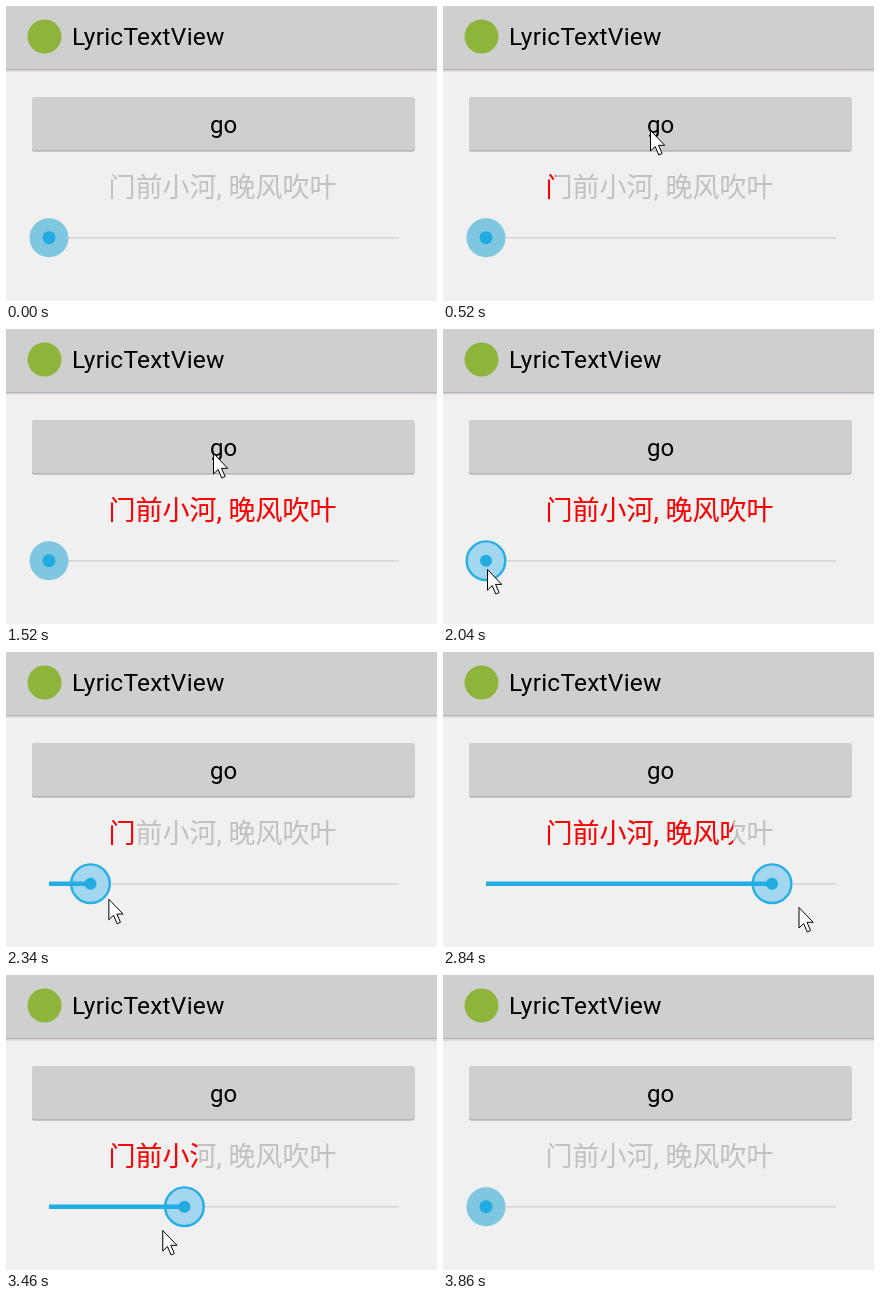
An HTML page for the animation above (4.08 s loop, 431 px wide and 295 px high).

```html
<!DOCTYPE html>
<html lang="zh">
<head>
<meta charset="utf-8">
<title>LyricTextView</title>
<style>
  html, body { margin: 0; width: 100%; height: 100%; overflow: hidden; background: #f0f0f0; }
  svg { display: block; width: 431px; height: 295px; }
  text { font-family: Roboto, "Noto Sans CJK SC", "Noto Sans CJK", sans-serif; }
  .label { font-size: 24px; fill: #000; }
  .title { font-size: 24.5px; letter-spacing: 0.22px; }
  .lyric { font-size: 27px; fill: #c1c1c1; }
  .sung { fill: #f00; }
  .halo { fill: #7fc6e1; r: 19.5px; }
  .dot { fill: #22abe0; r: 6.5px; }
  .held .halo { fill: #a3d6ef; stroke: #27aee3; stroke-width: 2.4px; r: 19.3px; }
  .held .dot { r: 6px; }
  #button { fill: #cfcfcf; }
  #button.held { fill: #a3cfe0; }
</style>
</head>
<body>
<svg viewBox="0 0 431 295">
  <defs>
    <clipPath id="wipe"><rect id="wipeBox" x="103" y="160" height="44" width="0"/></clipPath>
  </defs>

  <rect width="431" height="295" fill="#f0f0f0"/>
  <rect width="431" height="63" fill="#cfcfcf"/>
  <rect y="63" width="431" height="1.5" fill="#b7b0b7"/>
  <rect y="64.5" width="431" height="1.5" fill="#e0dde0"/>
  <circle cx="38.5" cy="30.5" r="17" fill="#8db53c"/>
  <text class="label title" x="66" y="39">LyricTextView</text>

  <rect x="26" y="92" width="382.5" height="53.5" rx="2" fill="#a0a0a0"/>
  <rect id="button" x="26" y="91" width="382.5" height="53.5" rx="2"/>
  <text class="label" x="217.7" y="127" text-anchor="middle">go</text>

  <text class="lyric" x="102.5" y="191">门前小河, 晚风吹叶</text>
  <g clip-path="url(#wipe)"><text class="lyric sung" x="102.5" y="191">门前小河, 晚风吹叶</text></g>

  <rect x="43" y="231" width="350" height="1.5" fill="#d5d5d5"/>
  <g id="slider">
    <circle id="halo" class="halo" cy="231.7"/>
    <rect id="bar" x="43" y="229.5" width="0" height="4.5" fill="#22aee4"/>
    <circle id="dot" class="dot" cy="231.7"/>
  </g>

  <path id="cursor" d="M0 0V20.5L4.7 16L8.3 24.5L11.6 23L8 14.8H14.2Z" fill="#fff" stroke="#000"/>
</svg>
<script>
const LOOP = 4080, END = 3860, DRAG = 2140;
const LEFT = 43, TRACK = 350, LYRIC = 229;
const $ = id => document.getElementById(id);

// Cosine ease from 0 to 1
function ease(t, start, length) {
  const k = Math.max(0, Math.min(1, (t - start) / length));
  return (1 - Math.cos(Math.PI * k)) / 2;
}

// The picture refreshes every 100 ms, with three short 20 ms ticks
function tick(t) {
  const shift = 20 * [520, 1740, 3360].filter(s => t >= s).length;
  return Math.min(END, Math.floor((t - shift) / 100) * 100 + shift);
}

// Share of the track covered by the thumb: dragged right, then back
const slide = t => ease(t, 2114, 1010) - ease(t, 3042, 730);

// Up to the button, down to the thumb, right, and back left
function pointer(t) {
  const enter = ease(t, 0, 420), leave = ease(t, 1520, 320);
  return [
    238 - 30.5 * enter - 163 * leave + 356 * ease(t, 2077, 991) - 371 * ease(t, 3025, 723),
    296 - 171.5 * enter + 114.5 * leave + 16.5 * ease(t, 1840, 1000) - 10 * ease(t, 3460, 300)
  ];
}

function draw(now) {
  const t = tick(now % LOOP);
  const pos = slide(t), x = LEFT + TRACK * pos;
  const sung = t > DRAG ? pos * LYRIC : Math.max(0, Math.min(LYRIC, (t - 475) * 0.223));

  $('button').classList.toggle('held', t >= 400 && t < 500);
  $('wipeBox').setAttribute('width', sung);
  $('bar').setAttribute('width', TRACK * pos);
  $('halo').setAttribute('cx', x);
  $('dot').setAttribute('cx', x);
  $('slider').classList.toggle('held', t >= DRAG - 100 && t < END);
  $('cursor').setAttribute('transform', `translate(${pointer(t)})`);
  $('cursor').style.display = t < END ? '' : 'none';
}

const start = performance.now();
(function frame() {
  draw(performance.now() - start);
  requestAnimationFrame(frame);
})();
</script>
</body>
</html>
```
